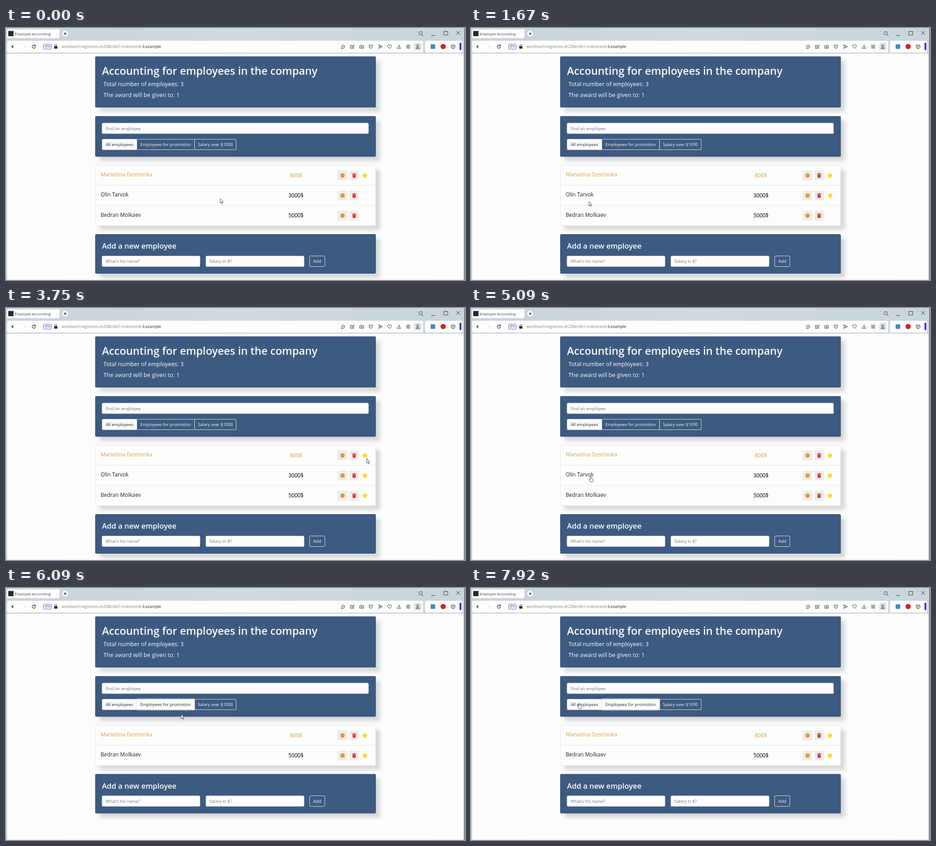
These frames come from a looping animation (1009 by 555 pixels, 8000 ms). An HTML page:

```html
<!DOCTYPE html>
<html lang="en">
<head>
<meta charset="utf-8">
<title>Employee Accounting</title>
<style>
  html, body { margin: 0; width: 100%; height: 100%; overflow: hidden; background: #fdfdfd; }
  svg { display: block; width: 100%; height: 100%; }
  text { font-family: "Open Sans", "Noto Sans", sans-serif; white-space: pre; }
</style>
</head>
<body>
<svg id="stage" viewBox="0 0 1009 555" xmlns="http://www.w3.org/2000/svg">
  <defs>
    <linearGradient id="sky"><stop offset="0" stop-color="#c8d3da"/><stop offset=".5" stop-color="#d0dadf"/><stop offset="1" stop-color="#c9d5db"/></linearGradient>
    <filter id="blur" x="-10%" y="-30%" width="120%" height="160%"><feGaussianBlur stdDeviation="4.8"/></filter>
  </defs>
</svg>
<script>
const LOOP = 8000;
const BLUE = '#3d5a80', PAPER = '#fdfdfd', INK = '#212529', GREY = '#6c757d', ORANGE = '#e09f3e';
const ROW_H = 44.3, LIST_Y = 302.5;
const stage = document.getElementById('stage');

function add(tag, attrs, parent = stage, content) {
  const node = document.createElementNS('http://www.w3.org/2000/svg', tag);
  set(node, attrs);
  if (content !== undefined) node.textContent = content;
  parent.appendChild(node);
  return node;
}
function set(node, attrs) {
  for (const key in attrs) node.setAttribute(key, attrs[key]);
}
const group = (parent = stage) => add('g', {}, parent);
const rect = (x, y, width, height, attrs, parent) => add('rect', { x, y, width, height, ...attrs }, parent);
const label = (x, y, size, fill, content, parent, attrs) =>
  add('text', { x, y, 'font-size': size, fill, ...attrs }, parent, content);
const line = (d, attrs, parent) =>
  add('path', { d, fill: 'none', stroke: '#35383c', 'stroke-width': 1, 'stroke-linecap': 'round', 'stroke-linejoin': 'round', ...attrs }, parent);

function shadow(x, y, w, h, parent) {
  return rect(x + 9.5, y + 9.5, w, h, { fill: '#000', opacity: .15, filter: 'url(#blur)' }, parent);
}
function panel(y, h, parent) {
  shadow(196, y, 617, h, parent);
  rect(196, y, 617, h, { rx: 2.5, fill: BLUE }, parent);
}
function field(x, y, w, hint, parent) {
  rect(x, y, w, 23.5, { rx: 2.5, fill: PAPER, stroke: '#ced4da', 'stroke-width': .6 }, parent);
  label(x + 8, y + 15.4, 9.36, GREY, hint, parent);
}

function drawBrowser() {
  rect(0, 0, 1009, 555, { fill: 'url(#sky)' });
  rect(2.5, 2.5, 115, 20, { rx: 3, fill: PAPER });
  rect(5, 6.5, 11.5, 11.5, { fill: '#20292d' });
  label(19, 15.5, 7.9, '#3a3d42', 'Employee Accounting');
  add('circle', { cx: 130, cy: 12.5, r: 6.5, fill: PAPER });
  line('M127.5 12.5h5M130 10v5', { 'stroke-width': 1.3 });
  line('M914.5 14.5l3 3M935 16.5h8M963 7.5h8v8h-8zM990 7l8 8M998 7l-8 8');
  add('circle', { cx: 911.5, cy: 11.5, r: 3.6, fill: 'none', stroke: '#35383c' });

  rect(2.5, 28, 914.5, 26, { rx: 4, fill: PAPER });
  rect(921, 28, 82, 26, { rx: 4, fill: PAPER });
  line('M15.5 38l-3 3 3 3M12.5 41h4', { 'stroke-width': 1.2 });
  line('M38.5 38l3 3-3 3', { stroke: '#c9ccd0' });
  line('M64 39a3.5 3.5 0 1 0 .6 2.6M64.6 37v2.4h-2.4', { 'stroke-width': 1.2 });
  rect(82.5, 35.5, 17.5, 11, { rx: 2.5, fill: '#f4f1ff', stroke: '#7b62c8' });
  label(91.3, 43.4, 6.4, '#4b3a94', 'VPN', stage, { 'text-anchor': 'middle' });
  rect(106, 40, 7, 5.5, { rx: 1, fill: '#25282c' });
  line('M107.5 40v-1.5a2 2 0 0 1 4 0V40', { stroke: '#25282c' });
  const url = label(122, 44, 8.57, '#7b8087', 'workteam-registries-vh294m6b1-mdostrenk.');
  add('tspan', { fill: '#25282c' }, url, 'li.example');

  rect(897.5, 33, 15.5, 15.5, { rx: 2, fill: '#dbe3e7' });
  const icons = [
    [741, 'M-3 2a3.6 3.6 0 1 1 2 1.4l-2 1.2zM-1.5 0h3.5'],
    [761, 'M0-3h-4v7h7V0M-1 1.5l.5-2L3.5-4l1.3 1.3L1 1z'],
    [782, 'M-4-2h2l1-1.5h2L2-2h2v5.5h-8zM-1.3.7a1.3 1.3 0 1 0 2.6 0a1.3 1.3 0 1 0-2.6 0'],
    [802, 'M0-4l3.8 1.2V.5Q3.5 3 0 4.2Q-3.5 3-3.8.5v-3.3zM-1.5 0l1.2 1.2L2-1.2'],
    [823, 'M-3.5-4L4.5 0l-8 4L-2 0zM-2 0h3'],
    [843, 'M0 4L-4 0a2.5 2.5 0 0 1 4-3a2.5 2.5 0 0 1 4 3z'],
    [864, 'M0-4v5.5M-2.5-.8L0 1.7l2.5-2.5M-4 2v2h8V2'],
    [884, 'M-4-3h8M-4 0h8M-4 3h8M2-4v2M-2-1v2M1 2v2'],
    [905, 'M-2-2a2 2 0 1 0 4 0a2 2 0 1 0-4 0M-3.2 4V2.5Q0 .2 3.2 2.5V4z'],
    [983, 'M0-4.5l4 2v4.8l-4 2.2l-4-2.2v-4.8zM-4-2.5L0-.5l4-2M0-.5v5']
  ];
  for (const [x, d] of icons) line(d, { transform: `translate(${x} 41)` });
  rect(933.5, 36, 10, 10, { rx: 1, fill: '#4a86c8' });
  add('circle', { cx: 961, cy: 40.8, r: 5.8, fill: '#d9202f' });
  rect(997, 32.5, 4, 16, { rx: 1, fill: '#4327d9' });

  rect(2.5, 56.5, 1002.5, 498, { rx: 4, fill: PAPER });
  rect(1007.6, 0, 1.4, 555, { fill: '#4b5257' });
}

function drawHeader() {
  panel(62.5, 112.5);
  label(211, 103, 23.4, PAPER, 'Accounting for employees in the company', stage, { 'font-weight': 600 });
  label(214, 128.4, 12.75, PAPER, 'Total number of employees: 3');
  label(214, 152, 12.75, PAPER, 'The award will be given to: 1');
}

function filterButton(x, w, title) {
  const box = rect(x + .5, 245, w, 23, { rx: 1.5, fill: PAPER, stroke: '#f8f9fa', 'stroke-width': .9 });
  const text = label(x + .5 + w / 2, 260, 9.36, PAPER, title, stage, { 'text-anchor': 'middle' });
  return amount => {
    box.setAttribute('fill-opacity', amount);
    const mix = (a, b) => Math.round(a + (b - a) * amount);
    text.setAttribute('fill', `rgb(${mix(253, 33)},${mix(253, 37)},${mix(253, 41)})`);
  };
}

function employeeRow(name, salary, color) {
  const g = group();
  label(208, 24.6, 11.75, color, name, g);
  label(637.5, 26.3, 11.75, color === INK ? '#000' : color, salary, g, { 'text-anchor': 'middle' });
  for (const x of [729, 754.5]) rect(x, 11.3, 21.5, 21.5, { rx: 2, fill: '#ededed' }, g);
  add('circle', { cx: 739.8, cy: 22.2, r: 5, fill: ORANGE }, g);
  for (const [x, y] of [[738, 20.5], [741.5, 20.3], [738.4, 24.2], [741.8, 23.6]])
    add('circle', { cx: x, cy: y, r: .65, fill: '#a8702a' }, g);
  add('path', { d: 'M761 18h2.7l.6-1h2.2l.6 1h2.7v1.4H761zM761.6 20.2h7.6l-.5 6.2q0 1-1 1h-4.6q-1 0-1-1z', fill: '#e5383b' }, g);
  const points = Array.from({ length: 10 }, (_, i) => {
    const r = i % 2 ? 2.9 : 5.9, a = i * Math.PI / 5;
    return `${(r * Math.sin(a)).toFixed(2)},${(-r * Math.cos(a)).toFixed(2)}`;
  }).join(' ');
  const star = add('polygon', { points, fill: '#ffd700', stroke: '#ffd700', 'stroke-width': .7, 'stroke-linejoin': 'round' }, g);
  return {
    place: y => g.setAttribute('transform', `translate(0 ${y})`),
    show: on => g.setAttribute('display', on ? 'inline' : 'none'),
    like: v => set(star, { opacity: v, transform: `translate(${789 + 19 * (1 - v)} 22.4)` })
  };
}

drawBrowser();
drawHeader();
panel(194, 89.5);
field(211, 209.2, 586, 'Find an employee');
const allButton = filterButton(211, 76, 'All employees');
const overButton = filterButton(414, 91.5, 'Salary over $1000');
const riseButton = filterButton(287, 127, 'Employees for promotion');
const ring = rect(286.2, 243.8, 128.6, 25.4, { rx: 2.5, fill: 'none', stroke: '#dbe6dc', 'stroke-width': 2.2 });
overButton(0);

const listShadow = shadow(196, LIST_Y, 617, 10);
const listBox = rect(196.3, LIST_Y, 616.4, 10, { rx: 2.5, fill: PAPER, stroke: '#dfdfdf', 'stroke-width': .8 });
const rules = [1, 2].map(i => line(`M196.5 ${LIST_Y + i * ROW_H - .3}H812.5`, { stroke: '#dfdfdf', 'stroke-width': .8 }));
const rows = [
  employeeRow('Marvelina Dostrenka', '800$', ORANGE),
  employeeRow('Olin Tarvok', '3000$', INK),
  employeeRow('Bedran Molkaev', '5000$', INK)
];

const form = group();
panel(454, 87, form);
label(211, 486, 16.4, PAPER, 'Add a new employee', form, { 'font-weight': 600 });
field(211, 502, 215.5, "What's his name?", form);
field(439.3, 502, 216, 'Salary in $?', form);
rect(667.5, 502, 33.5, 23.5, { rx: 2.5, fill: 'none', stroke: '#f8f9fa', 'stroke-width': .9 }, form);
label(684.2, 517.4, 9.36, PAPER, 'Add', form, { 'text-anchor': 'middle' });

const arrow = add('path', { d: 'M0 0V9.6L2.2 7.7L3.7 11L5.3 10.3L3.9 7.1L6.6 6.8Z', fill: '#fff', stroke: '#222', 'stroke-width': .8 });
const hand = add('path', {
  d: 'M-1 .6Q0-.8 1 .6V4.2Q2.2 3.6 2.7 4.6Q4 4.1 4.3 5.2Q5.8 5 5.7 6.4V8.6Q5.5 10.4 4.5 11.8H-.6Q-1.4 9.8-3.8 7.4Q-4 5.9-2.4 6.3L-1 7.5Z',
  fill: '#fff', stroke: '#222', 'stroke-width': .8, 'stroke-linejoin': 'round'
});

// Pointer stops: time, x, y
const path = [
  [0, 471, 376], [90, 471, 376], [840, 266, 370], [1000, 266, 370], [1090, 261, 368], [1430, 261, 368],
  [1670, 259, 382], [2150, 262, 412], [2750, 262, 412], [3500, 795, 350], [3750, 793, 332],
  [4020, 796, 395], [4340, 795, 362], [5050, 263, 371], [5300, 263, 371], [5980, 385, 260],
  [6040, 385, 260], [6090, 385, 278], [6840, 795, 352], [6920, 795, 352], [7000, 794, 342],
  [7640, 238, 254], [LOOP, 238, 254]
];
const ramp = (t, start, length) => Math.min(1, Math.max(0, (t - start) / length));
const smooth = p => p * p * (3 - 2 * p);
const easeOut = p => 1 - (1 - p) * (1 - p);

function pointerAt(t) {
  let i = 1;
  while (i < path.length - 1 && path[i][0] <= t) i++;
  const [t0, x0, y0] = path[i - 1], [t1, x1, y1] = path[i];
  const p = smooth(ramp(t, t0, t1 - t0));
  return [x0 + (x1 - x0) * p, y0 + (y1 - y0) * p];
}

function clickable(x, y, count) {
  if (x > 211 && x < 506 && y > 245 && y < 268) return true;
  const onIcon = (x > 729 && x < 751) || (x > 755 && x < 776);
  for (let i = 0; i < count; i++) {
    const top = LIST_Y + i * ROW_H;
    if (x > 208 && x < 555 && Math.abs(y - top - 20.8) < 8) return true;
    if (onIcon && Math.abs(y - top - 22) < 11) return true;
  }
  return false;
}

function draw(t) {
  const filtered = t >= 6070;
  const count = filtered ? 2 : 3;
  const height = count * ROW_H;
  listShadow.setAttribute('height', height);
  listBox.setAttribute('height', height);
  rules[1].setAttribute('display', filtered ? 'none' : 'inline');
  form.setAttribute('transform', `translate(0 ${filtered ? -44.5 : 0})`);

  rows[0].place(LIST_Y);
  rows[1].place(LIST_Y + ROW_H);
  rows[2].place(LIST_Y + (count - 1) * ROW_H);
  rows[1].show(!filtered);
  rows[0].like(1);
  rows[1].like(easeOut(ramp(t, 1430, 300)) - easeOut(ramp(t, 5250, 300)));
  rows[2].like(easeOut(ramp(t, 2240, 300)));

  allButton(1 - smooth(ramp(t, 6090, 150)) + smooth(ramp(t, 7600, 150)));
  riseButton(smooth(ramp(t, 5880, 150)));
  ring.setAttribute('opacity', .75 * ramp(t, 6020, 150) - .3 * ramp(t, 7750, 170));

  const [x, y] = pointerAt(t);
  const over = clickable(x, y, count);
  const transform = `translate(${x.toFixed(1)} ${y.toFixed(1)})`;
  set(arrow, { transform, display: over ? 'none' : 'inline' });
  set(hand, { transform, display: over ? 'inline' : 'none' });
}

const start = performance.now();
function tick() {
  draw((performance.now() - start) % LOOP);
  requestAnimationFrame(tick);
}
tick();
</script>
</body>
</html>
```
